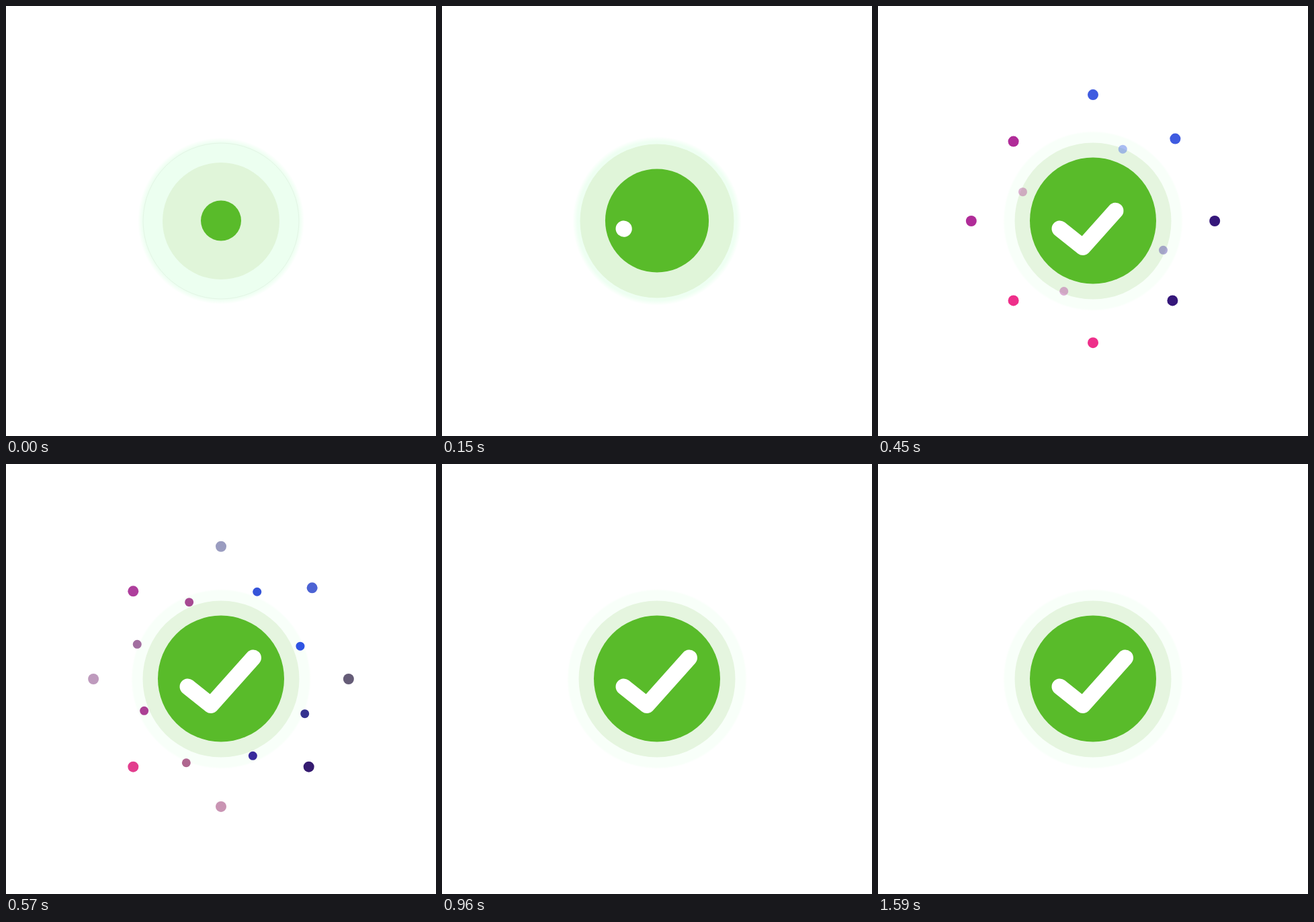
Recreate the animation shown at these times as an HTML page with a canvas. Size 640 by 640 pixels, loop 1.62 s.

```html
<!DOCTYPE html>
<html lang="en">
<head>
<meta charset="utf-8">
<title>Success check</title>
<style>
  html, body { margin: 0; width: 100%; height: 100%; overflow: hidden; background: #fff; }
  canvas { display: block; width: 100%; height: 100%; }
</style>
</head>
<body>
<canvas id="stage" width="640" height="640"></canvas>
<script>
const ctx = document.getElementById('stage').getContext('2d');
const LOOP = 1620, STEP = 30, CENTER = 320;

const clamp = v => Math.min(1, Math.max(0, v));
const mix = (a, b, k) => a + (b - a) * k;
const span = (t, from, to) => clamp((t - from) / (to - from));
const easeOut = (u, power) => 1 - (1 - u) ** power;
const easeInOut = u => u < 0.5 ? 2 * u * u : 1 - 2 * (1 - u) ** 2;

const channels = hex => [1, 3, 5].map(i => parseInt(hex.slice(i, i + 2), 16));
const rgba = (rgb, alpha = 1) => `rgba(${rgb.join()},${alpha})`;
const mixRgb = (a, b, k) => a.map((v, i) => Math.round(mix(v, b[i], k)));
const palette = list => list.split(' ').map(channels);

const YOUNG = palette('#2d54e8 #3a24a0 #ad2a96 #a8348c');
const BRIGHT = palette('#3f5be0 #35177a #ee2f8a #b02c98');
const ASHEN = palette('#9a9090 #333333 #9a98a5 #a5a5b0');
const DUSKY = palette('#3050d4 #35439a #8c8a92 #9a98a5');

// Each burst is four dots a quarter turn apart, the first flying a little farther.
const bursts = [
  { start: 160, angle: -90,   reach: 191.5, size: 8,   late: ASHEN, turn: [300, 470] },
  { start: 245, angle: -45,   reach: 191.5, size: 8,   late: ASHEN, turn: [300, 470] },
  { start: 380, angle: -67.5, reach: 151,   size: 6.5, late: DUSKY, turn: [80, 260] },
  { start: 450, angle: -22.5, reach: 151,   size: 6.5, late: DUSKY, turn: [80, 260] }
];

function disc(x, y, radius, fill) {
  ctx.fillStyle = fill;
  ctx.beginPath();
  ctx.arc(x, y, radius, 0, Math.PI * 2);
  ctx.fill();
}

function drawHalo(t) {
  const spread = 0.3 * span(t, 0, 270) + 0.7 * span(t, 270, 450);
  const solid = mix(116, 131, spread), edge = mix(124, 134, spread);
  const tint = mixRgb(channels('#ecfff0'), channels('#f8fff9'), spread);
  const glow = ctx.createRadialGradient(CENTER, CENTER, solid, CENTER, CENTER, edge);
  glow.addColorStop(0, rgba(tint));
  glow.addColorStop(1, rgba(tint, 0));
  disc(CENTER, CENTER, edge, glow);

  if (t < 90) {
    ctx.strokeStyle = rgba(channels('#e3f5e5'), 1 - t / 90);
    ctx.lineWidth = 1;
    ctx.beginPath();
    ctx.arc(CENTER, CENTER, 116, 0, Math.PI * 2);
    ctx.stroke();
  }

  const ring = mix(87, 116.5, easeOut(span(t, 0, 202), 2));
  const ringTint = mixRgb(channels('#e0f5d9'), channels('#e5f5df'), span(t, 270, 450));
  disc(CENTER, CENTER, ring, rgba(ringTint));
}

function drawBurst({ start, angle, reach, size, late, turn }, t) {
  const age = t - start;
  const alpha = span(age, 45, 110) * (1 - span(age, 380, 505));
  if (alpha <= 0) return;
  const progress = easeOut(clamp(age / 550), 3);
  for (let i = 0; i < 4; i++) {
    const distance = mix(94, reach + (i ? 0 : 7.5), progress);
    const a = (angle + i * 90) * Math.PI / 180;
    const bright = mixRgb(YOUNG[i], BRIGHT[i], span(age, 110, 200));
    const color = mixRgb(bright, late[i], span(age, ...turn));
    disc(CENTER + distance * Math.cos(a), CENTER + distance * Math.sin(a), size, rgba(color, alpha));
  }
}

function drawCheck(t) {
  if (t < 135) return;
  const points = [[270.5, 331.5], [305, 359], [368, 288.5]];
  const lengths = [0, 1].map(i =>
    Math.hypot(points[i + 1][0] - points[i][0], points[i + 1][1] - points[i][1]));
  let left = (lengths[0] + lengths[1]) * easeInOut(span(t, 135, 573));
  ctx.strokeStyle = '#fff';
  ctx.lineWidth = 24;
  ctx.lineCap = ctx.lineJoin = 'round';
  ctx.beginPath();
  ctx.moveTo(...points[0]);
  for (let i = 0; i < 2 && left > 0; i++) {
    const k = Math.min(1, left / lengths[i]);
    ctx.lineTo(mix(points[i][0], points[i + 1][0], k), mix(points[i][1], points[i + 1][1], k));
    left -= lengths[i];
  }
  ctx.stroke();
}

function draw(t) {
  ctx.fillStyle = '#fff';
  ctx.fillRect(0, 0, 640, 640);
  drawHalo(t);
  bursts.forEach(burst => drawBurst(burst, t));
  disc(CENTER, 319.5, mix(30, 94, easeOut(span(t, 0, 309), 2)), '#59bb2a');
  drawCheck(t);
}

const began = performance.now();
function tick() {
  const elapsed = (performance.now() - began) % LOOP;
  draw(Math.floor(elapsed / STEP) * STEP);
  requestAnimationFrame(tick);
}
tick();
</script>
</body>
</html>
```
